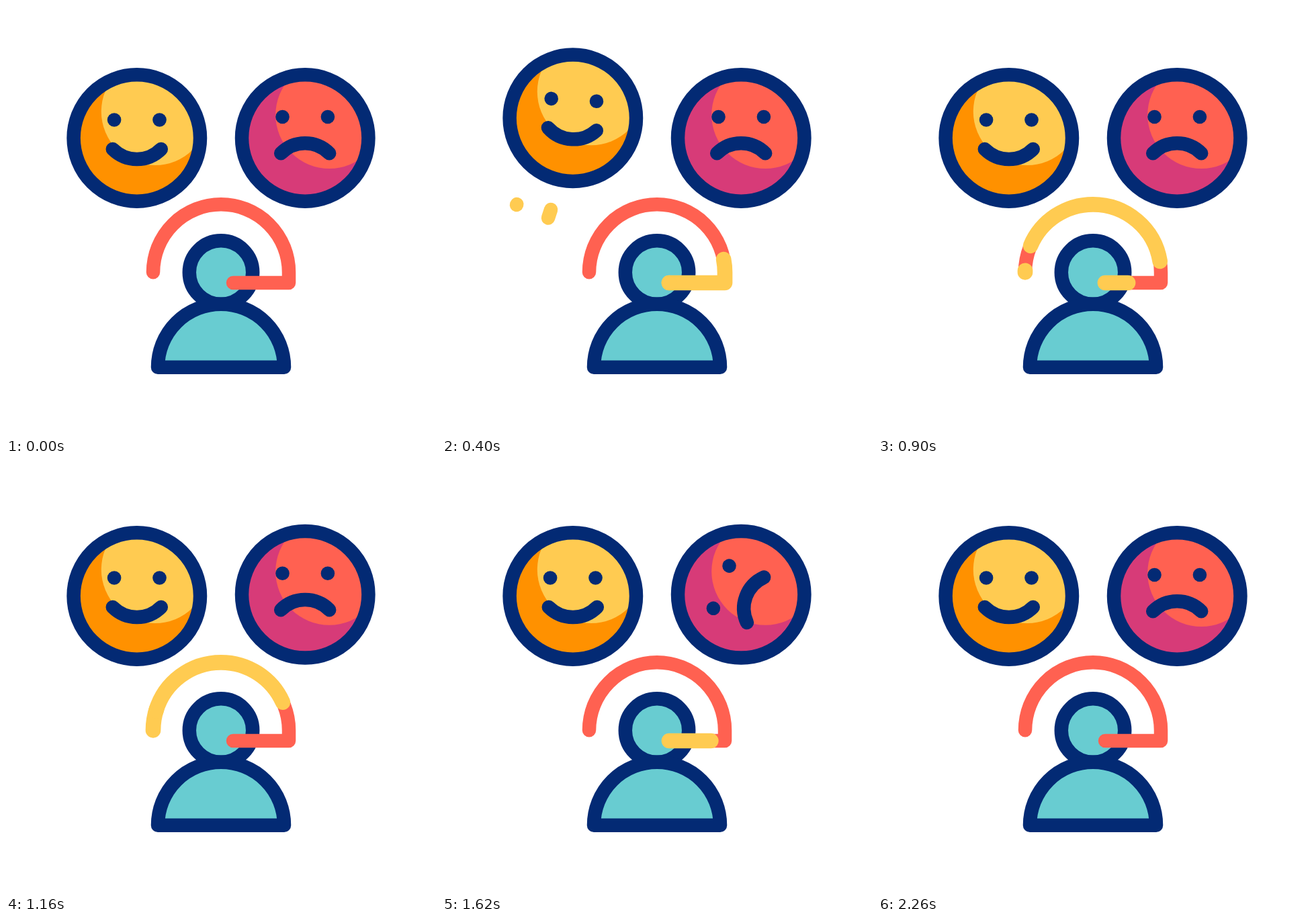
An HTML page with a canvas that plays this animation: 640x640 px, repeating every 2.4 s.

```html
<!DOCTYPE html>
<html lang="en">
<head>
<meta charset="utf-8">
<title>Feedback</title>
<style>
  html, body { margin: 0; width: 100%; height: 100%; overflow: hidden; background: #fff; }
  canvas { display: block; width: 640px; height: 640px; }
</style>
</head>
<body>
<canvas id="stage" width="640" height="640"></canvas>
<script>
const ctx = document.getElementById('stage').getContext('2d');
const LOOP = 2400;
const NAVY = '#032a74', TEAL = '#68ccd1', RED = '#ff6151', YELLOW = '#ffcb51';
const ORANGE = '#ff9100', MAGENTA = '#d73b78';
const STROKE = 20.5;

const clamp = v => Math.min(1, Math.max(0, v));
const smooth = v => v * v * (3 - 2 * v);

// Cubic easing with flat ends; a and b are the horizontal handle positions.
function ease(u, a, b) {
  u = clamp(u);
  let lo = 0, hi = 1;
  for (let i = 0; i < 24; i++) {
    const s = (lo + hi) / 2, r = 1 - s;
    if (3 * a * s * r * r + 3 * b * s * s * r + s * s * s < u) lo = s; else hi = s;
  }
  return smooth(hi);
}

function stroke(color, width = STROKE) {
  ctx.strokeStyle = color;
  ctx.lineWidth = width;
  ctx.stroke();
}

function disc(x, y, r, color) {
  ctx.beginPath();
  ctx.arc(x, y, r, 0, 7);
  ctx.fillStyle = color;
  ctx.fill();
}

const faces = [
  { x: 194.8, peak: 384, span: 302, dark: ORANGE, light: YELLOW, shine: [27, -39.5],
    eyeY: -27, mouthY: -19.2, mouthMid: Math.PI / 2,
    sparks: [[119, 271, 111, 296, 5], [168.5, 283.5, 158, 315.5, 40]] },
  { x: 445.2, peak: 1391, span: 320, dark: MAGENTA, light: RED, shine: [36, -34.5],
    eyeY: -31.5, mouthY: 58.5, mouthMid: -Math.PI / 2,
    sparks: [[457.5, 283, 461.5, 311.5, 23], [508, 275, 512, 301, -2]] }
];

function drawSpark([x0, y0, x1, y1, delay], local) {
  const front = clamp((local + 164 - delay) / 100);
  const back = clamp((local + 84 - delay) / 100);
  if (front <= 0 || back >= 1) return;
  const at = k => [x0 + (x1 - x0) * k, y0 + (y1 - y0) * k];
  ctx.beginPath();
  ctx.moveTo(...at(back));
  ctx.lineTo(...at(front));
  stroke(YELLOW);
}

function drawFace(face, t) {
  const local = t - face.peak, u = local / face.span;
  const lift = 30 * (u < 0 ? ease(1 + u, .67, .67) : 1 - ease(u, .33, .33));
  face.sparks.forEach(s => drawSpark(s, local));

  ctx.save();
  ctx.translate(face.x, 196.5 - lift);
  disc(0, 0, 94, face.dark);
  ctx.save();
  ctx.clip();
  disc(...face.shine, 80, face.light);
  ctx.restore();
  ctx.beginPath();
  ctx.arc(0, 0, 94.2, 0, 7);
  stroke(NAVY);

  ctx.rotate(2 * Math.PI * smooth(clamp(u)));
  disc(-33.7, face.eyeY, 10.3, NAVY);
  disc(33.7, face.eyeY, 10.3, NAVY);
  ctx.beginPath();
  ctx.arc(0, face.mouthY, 50.7, face.mouthMid - .79, face.mouthMid + .79);
  stroke(NAVY);
  ctx.restore();
}

function drawPerson() {
  ctx.fillStyle = TEAL;
  ctx.beginPath();
  ctx.arc(320, 396.5, 47.2, 0, 7);
  ctx.fill();
  stroke(NAVY);
  ctx.beginPath();
  ctx.arc(320, 537.7, 94, Math.PI, 0);
  ctx.closePath();
  ctx.fill();
  stroke(NAVY);
}

const headset = new Path2D('M338 412H421V396.3A101 101 0 0 0 219 396.3');
const HEADSET_LENGTH = 98.7 + Math.PI * 101;
const pulseStarts = [0, 380, 624, 1283];

function drawPulse(age) {
  if (age < 18 || age > 960) return;
  const front = HEADSET_LENGTH * ease((age - 18) / 657, 1, .4);
  const back = HEADSET_LENGTH * ease((age - 400) / 560, .25, .27);
  ctx.setLineDash([Math.max(.05, front - back), 1000]);
  ctx.lineDashOffset = -Math.min(back, HEADSET_LENGTH - .1);
  ctx.strokeStyle = YELLOW;
  ctx.lineWidth = 22.7;
  ctx.stroke(headset);
  ctx.setLineDash([]);
}

function draw(now) {
  const t = now % LOOP;
  ctx.fillStyle = '#fff';
  ctx.fillRect(0, 0, 640, 640);
  ctx.lineCap = ctx.lineJoin = 'round';
  faces.forEach(face => drawFace(face, t));
  drawPerson();
  ctx.strokeStyle = RED;
  ctx.lineWidth = STROKE;
  ctx.stroke(headset);
  pulseStarts.forEach(start => drawPulse(t - start));
}

const begin = performance.now();
function tick() {
  draw(performance.now() - begin);
  requestAnimationFrame(tick);
}
tick();
</script>
</body>
</html>
```
